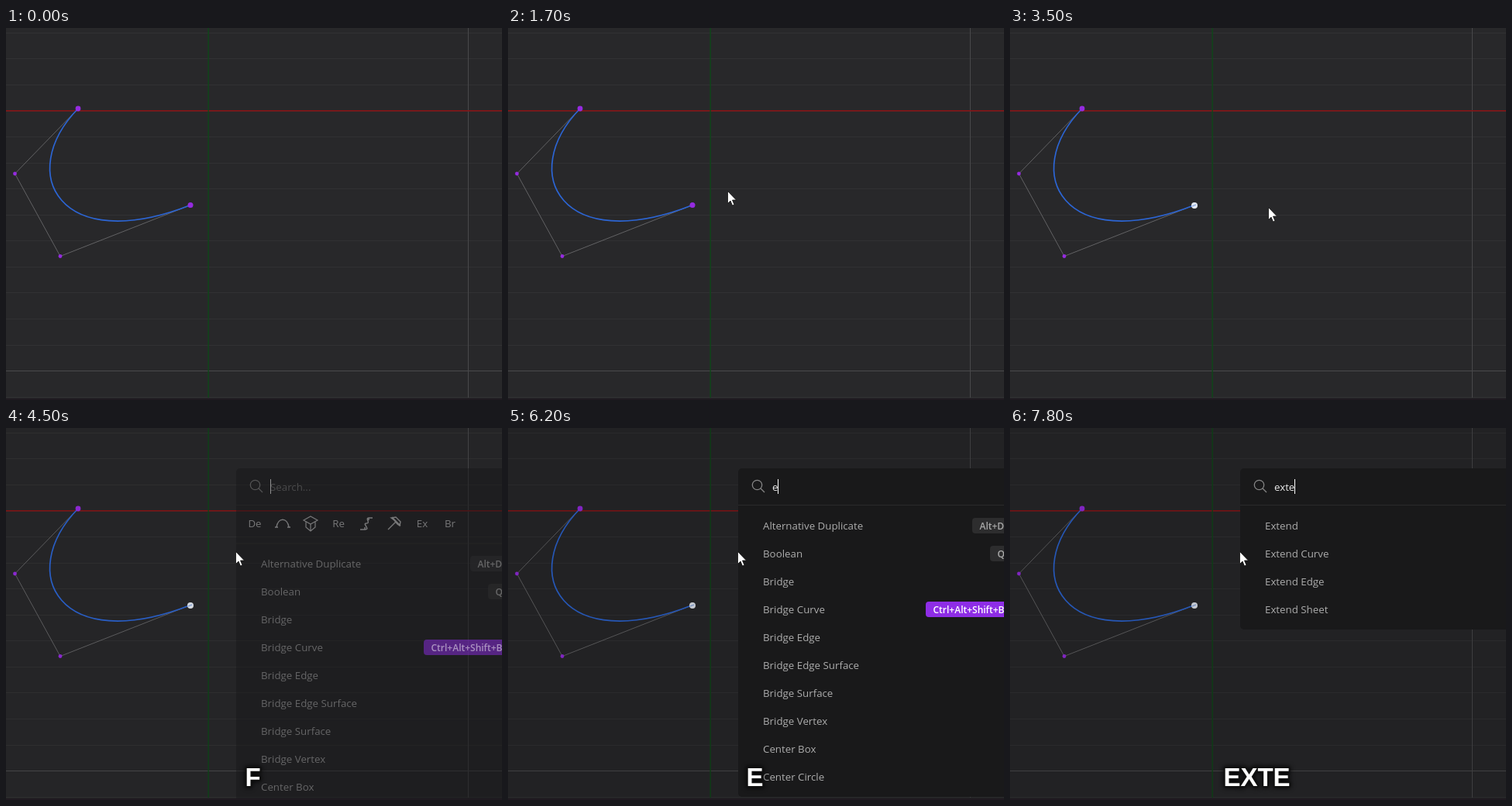
An HTML page with a canvas that plays this animation: 640 px wide and 480 px high, repeating every 8 s.

```html
<!DOCTYPE html>
<html>
<head>
<meta charset="utf-8">
<style>
  html, body { margin: 0; width: 100%; height: 100%; overflow: hidden; background: #28282a; }
  canvas { display: block; }
</style>
</head>
<body>
<canvas id="stage" width="640" height="480"></canvas>
<script>
const c = document.getElementById('stage').getContext('2d');
const LOOP = 8000, STEP = 100, GRID = 33.57;
const UI = '13.3px "Open Sans", "Noto Sans", sans-serif';
const CHIP = '600 12px "Open Sans", "Noto Sans", sans-serif';
const KEYS = 'bold 33px "Liberation Sans", Arial, sans-serif';

// Pointer path: time, x, y
const pointer = [
  [500, 513, 448], [700, 437, 350], [900, 370, 275], [1100, 320, 222], [1300, 298, 199],
  [1400, 296, 195], [1600, 296, 195], [1700, 283, 210], [2000, 222, 286], [2200, 232, 272],
  [2400, 232, 272], [2500, 250, 284], [2700, 333, 264], [2800, 349, 255], [3400, 349, 255],
  [3500, 333, 231], [3700, 305, 178], [3800, 298, 163], [3900, 296, 159]
];

const allCommands = ['Alternative Duplicate', 'Boolean', 'Bridge', 'Bridge Curve', 'Bridge Edge',
  'Bridge Edge Surface', 'Bridge Surface', 'Bridge Vertex', 'Center Box', 'Center Circle'];
const extend = ['Extend', 'Extend Curve', 'Extend Edge', 'Extend Sheet'];
const matchExt = [...extend, 'Extrude', 'Extract Edge', 'Export', 'Text', 'Delete Vertex', 'Create Text'];
const matchEx = [...extend, 'Export', 'Extrude', 'Explode', 'Bridge Vertex', 'Text', 'Extract Edge'];
const chips = {
  'Alternative Duplicate': ['Alt+D', 599],
  'Boolean': ['Q', 622],
  'Bridge Curve': ['Ctrl+Alt+Shift+B', 539]
};

// Value of the last [time, value] entry already reached
const at = (t, steps) => steps.reduce((v, [s, next]) => t >= s ? next : v, undefined);
const typed = t => at(t, [[0, ''], [6200, 'e'], [6700, 'ex'], [7300, 'ext'], [7700, 'exte']]);
const results = t => at(t, [[0, allCommands], [6800, matchEx], [7400, matchExt], [7800, extend]]);
const pressed = t => at(t, [[0, ''], [4500, 'F'], [5500, ''], [6200, typed(t).toUpperCase()]]);

function pointerAt(t) {
  if (t < pointer[0][0]) return null;
  const i = pointer.findIndex(p => p[0] > t);
  if (i < 0) return pointer[pointer.length - 1].slice(1);
  const [a, ax, ay] = pointer[i - 1], [b, bx, by] = pointer[i];
  const k = (t - a) / (b - a);
  return [ax + (bx - ax) * k, ay + (by - ay) * k];
}

function rect(x, y, w, h, color) {
  c.fillStyle = color;
  c.fillRect(x, y, w, h);
}

function round(x, y, w, h, r, color) {
  c.fillStyle = color;
  c.beginPath();
  c.roundRect(x, y, w, h, r);
  c.fill();
}

function dot(x, y, r, color) {
  c.fillStyle = color;
  c.beginPath();
  c.arc(x, y, r, 0, 7);
  c.fill();
}

function stroke(path, color, width = 1) {
  c.strokeStyle = color;
  c.lineWidth = width;
  c.stroke(new Path2D(path));
}

function text(s, x, y, color, font = UI, align = 'left') {
  c.font = font;
  c.textAlign = align;
  c.fillStyle = color;
  c.fillText(s, x, y);
}

function drawGrid() {
  rect(0, 0, 640, 480, '#28282a');
  for (let i = -3; i < 12; i++) rect(0, Math.round(106.5 + i * GRID), 640, 1, '#313133');
  rect(0, 442, 640, 1, '#4a4a4c');
  rect(596, 0, 1, 477, '#48484a');
  rect(0, 106, 640, 1.6, '#861416');
  rect(260.5, 0, 1.3, 477, '#0d4a17');
}

function drawSelection(t, tip) {
  if (t < 1800 || t >= 2500) return;
  const [x, y] = [tip[0] - 1, tip[1] - 2];
  rect(x, 195, 296 - x, y - 195, '#295a57');
  if (x < 261) rect(261, 195, 1, y - 195, '#557f79');
}

function drawCurve(t) {
  stroke('M93 104L11.5 188L70 294.5L238 228.5', '#626264');
  stroke('M93 104C11.5 188 70 294.5 238 228.5', '#2c65d4', 1.7);
  dot(93, 104, 3.4, '#952be0');
  dot(11.5, 188, 2.4, '#952be0');
  dot(70, 294.5, 2.4, '#952be0');
  if (t < 1900) dot(238, 228.5, 3.5, '#952be0');
  else if (t < 2500) dot(238, 229, 4, '#c4c8cc');
  else {
    dot(238, 229, 4, '#e4e9f2');
    stroke('M235 230L240 228', '#7d9fdd', 1.3);
  }
}

function drawTools() {
  const ink = '#d2d2d2';
  [['De', 321], ['Re', 429], ['Ex', 537], ['Br', 573]].forEach(([s, x]) => text(s, x, 127.5, ink, UI, 'center'));
  stroke('M349 128C351 115 363 115 365 128M347 128h4M363 128h4', ink, 1.5);
  stroke('M384 119L393 114L402 119L393 124ZM387 121v7L393 133L399 128v-7M393 124v9', ink, 1.2);
  stroke('M457 131h6C471 131 459 123 465 123S463 116 468 116h5M463 128v3M468 116v3', ink, 1.5);
  stroke('M493 131L503 121M498 115L509 126M497 116L503 115L509 121L508 126L505 124L501 119Z', ink, 1.4);
}

function drawPalette(t) {
  const query = typed(t), rows = results(t);
  const top = query ? 126 : 175;
  round(297, 52, 380, top - 18 + rows.length * 36 + 8 - 52, 5, '#19191a');
  rect(297, 99, 343, 1, '#2a2a2b');

  c.strokeStyle = '#858585';
  c.lineWidth = 1.3;
  c.beginPath();
  c.arc(321.5, 73.5, 6.2, 0, 7);
  c.stroke();
  stroke('M326 78L331 83', '#858585', 1.3);

  if (query) text(query, 341, 81, '#ececec');
  else {
    text('Search...', 341, 81, '#757575');
    rect(297, 148.5, 343, 1, '#2a2a2b');
    drawTools();
  }
  if (query || t < 5100 || t >= 5700) {
    c.font = UI;
    rect(341 + Math.round(c.measureText(query).width), 66, 1, 19, '#fff');
  }

  rows.forEach((name, i) => {
    const y = top + i * 36;
    text(name, 329, y + 5, '#adadad');
    if (!chips[name]) return;
    const [keys, x] = chips[name], hot = name === 'Bridge Curve';
    round(x, y - 10, 651 - x, 20, 4, hot ? '#8e2de6' : '#2d2d2e');
    text(keys, x + 9.5, y + 4.5, hot ? '#fff' : '#a8a8a8', CHIP);
  });
}

function drawKeys(s) {
  if (!s) return;
  c.save();
  c.font = KEYS;
  c.textAlign = 'center';
  c.lineJoin = 'round';
  c.lineWidth = 4;
  c.strokeStyle = '#111';
  c.shadowColor = '#000';
  c.shadowBlur = 6;
  c.strokeText(s, 318.5, 462);
  c.restore();
  text(s, 318.5, 462, '#fff', KEYS, 'center');
}

function drawPointer([x, y]) {
  const arrow = new Path2D('M.5 .5V16.5L4 13L6.5 19L9 18L6.5 12H11.5Z');
  c.save();
  c.translate(x, y);
  c.fillStyle = '#fff';
  c.fill(arrow);
  c.strokeStyle = '#111';
  c.lineWidth = .8;
  c.stroke(arrow);
  c.restore();
}

function draw(now) {
  const t = Math.floor(now % LOOP / STEP) * STEP;
  const tip = pointerAt(t);
  drawGrid();
  drawSelection(t, tip);
  drawCurve(t);
  if (t >= 4500) {
    c.globalAlpha = t < 4600 ? .5 : 1;
    rect(0, 0, 640, 480, 'rgba(0,0,0,.14)');
    drawPalette(t);
    c.globalAlpha = 1;
  }
  rect(0, 478, 640, 2, '#1f1a20');
  drawKeys(pressed(t));
  if (tip) drawPointer(tip);
}

const start = performance.now();
function frame() {
  draw(performance.now() - start);
  requestAnimationFrame(frame);
}
frame();
</script>
</body>
</html>
```
